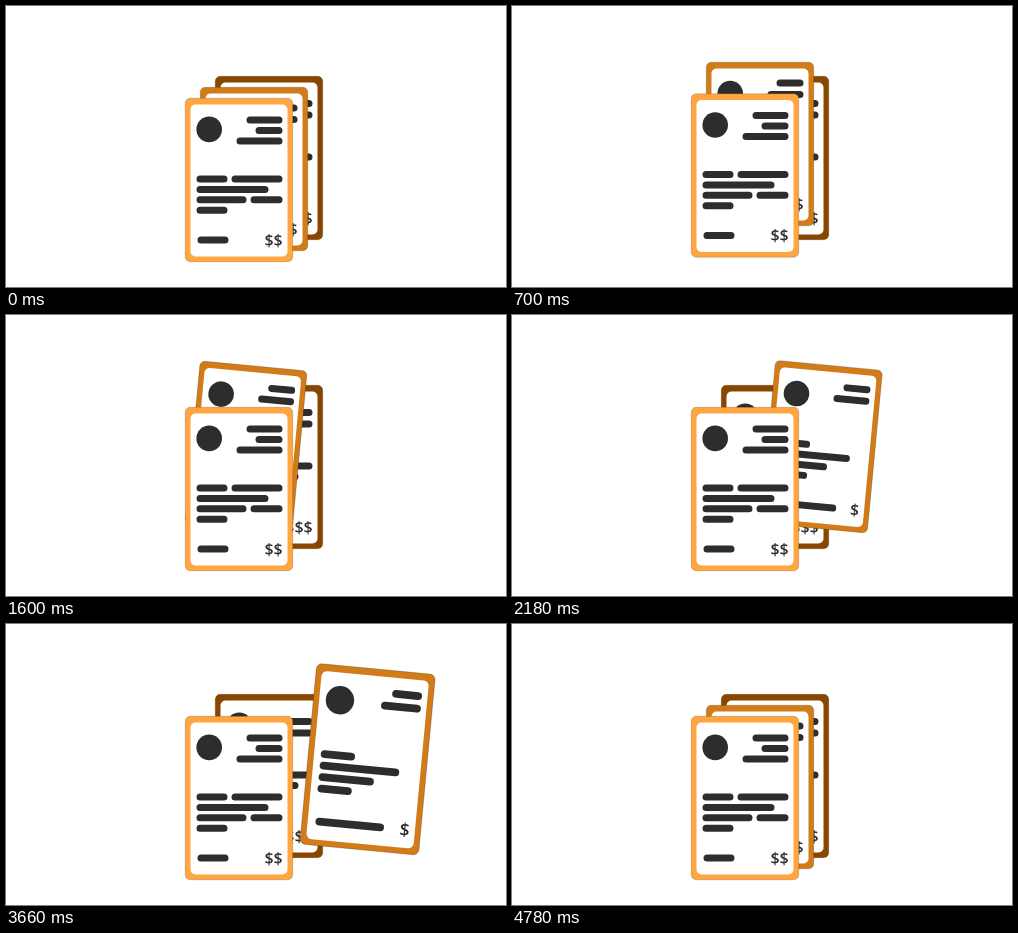
An HTML page that plays this animation: 500x281 px, repeating every 4.8 s.

```html
<!DOCTYPE html>
<html lang="en">
<head>
<meta charset="utf-8">
<title>Stack of bills</title>
<style>
html, body { margin: 0; width: 100%; height: 100%; overflow: hidden; background: #fff; }
svg { display: block; width: 100%; height: 100%; }
text { font: 600 16px "Open Sans", "Noto Sans", sans-serif; text-anchor: end; fill: #2d2d2d; }
</style>
</head>
<body>
<svg id="stage" viewBox="0 0 500 281"></svg>
<script>
const LOOP = 4800;
const TILT = 5.4;
const LEFT = 11.5, RIGHT = 97.5;
const SHORT = 31;
const stage = document.getElementById('stage');

const bar = (from, to, y) => `M${from + 3.5} ${y}H${to - 3.5}`;

// head: widths of the right-aligned bars; filled: how many even body rows reach the right edge.
function addCard({ color, price, head, top, pitch, filled }) {
  const bars = head.map((width, i) => bar(RIGHT - width, RIGHT, top + pitch * i));
  [SHORT, 72, 50, SHORT].forEach((width, row) => {
    const y = 81 + 10.4 * row;
    const end = LEFT + width;
    bars.push(bar(LEFT, end, y));
    if (row % 2 === 0 && row / 2 < filled) bars.push(bar(end + 4, RIGHT, y));
  });
  bars.push(bar(12.5, 12.5 + 2 * SHORT / price.length, 142));

  const group = document.createElementNS('http://www.w3.org/2000/svg', 'g');
  group.innerHTML = `
    <rect x=".25" y=".25" width="107.5" height="163.5" rx="5" fill="${color}" stroke="#000" stroke-opacity=".35" stroke-width=".5"/>
    <rect x="5.5" y="6.5" width="97" height="152" rx="5" fill="#fff"/>
    <circle cx="24.2" cy="31.4" r="12.8" fill="#2d2d2d"/>
    <path d="${bars.join('')}" stroke="#2d2d2d" stroke-width="7" stroke-linecap="round"/>
    <text x="97.7" y="147.7">${price}</text>`;
  stage.append(group);
  return group;
}

const back = addCard({ color: '#884600', price: '$$$', head: [36, 27], top: 27.5, pitch: 11.5, filled: 1 });
const middle = addCard({ color: '#d27b19', price: '$', head: [27, 36], top: 21, pitch: 11.5, filled: 0 });
const front = addCard({ color: '#ffa640', price: '$$', head: [36, 27, 46], top: 22, pitch: 10.5, filled: 2 });

const ramp = (t, from, to) => Math.max(0, Math.min(1, (t - from) / (to - from)));
const ease = (t, from, to) => (1 - Math.cos(Math.PI * ramp(t, from, to))) / 2;

// Cards are stepped back up and right; each hop starts as the one before it peaks.
function place(card, depth, t, dx = 0, dy = 0, angle = 0, scale = 1) {
  const beat = 365;
  const start = 60 + beat * depth;
  const peak = start + beat;
  const hop = (32 - 3 * depth) * (ease(t, start, peak) - ease(t, peak, peak + beat));
  const x = 179 + 15 * depth + dx;
  const y = 92 - 11 * depth - hop + dy;
  card.setAttribute('transform', `translate(${x} ${y}) rotate(${angle}) scale(${scale})`);
}

function draw(t) {
  // The middle card tilts, lifts, slides out, grows, and returns.
  const tilt = ramp(t, 1140, 1200) - ramp(t, 4720, 4780);
  const lift = ease(t, 1160, 1640) - ease(t, 4300, 4780);
  const slide = ease(t, 1874, 2454) - ease(t, 4043, 4300);
  const grow = ease(t, 2420, 2850) - ease(t, 3650, 4050);

  place(front, 0, t);
  place(middle, 1, t, 127 * slide - 10.5 * grow, -36 * lift - 6 * grow, TILT * tilt, 1 + 0.11 * grow);
  place(back, 2, t);
}

function frame(now) {
  draw(now % LOOP);
  requestAnimationFrame(frame);
}
draw(0);
requestAnimationFrame(frame);
</script>
</body>
</html>
```
